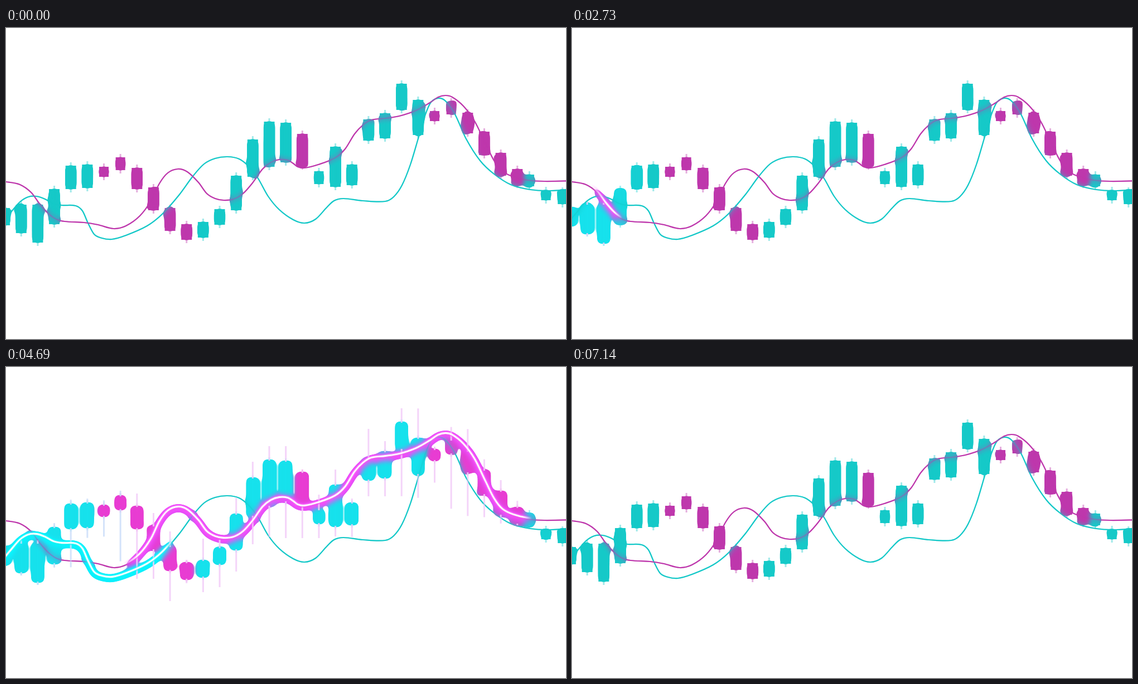
An HTML page with a canvas that plays this animation: 1004 by 558 pixels, repeating every 7.21 s.

```html
<!DOCTYPE html>
<html lang="en">
<head>
<meta charset="utf-8">
<title>Candles</title>
<style>
html, body { margin: 0; width: 100%; height: 100%; overflow: hidden; background: #fff; }
#stage { position: relative; width: 1004px; height: 558px; overflow: hidden; }
canvas { position: absolute; left: -20px; top: 0; }
#goo { filter: url(#merge); }
svg { position: absolute; width: 0; height: 0; }
</style>
</head>
<body>
<svg><filter id="merge" x="0" y="0" width="100%" height="100%" color-interpolation-filters="sRGB">
  <feGaussianBlur stdDeviation="5"/>
  <feColorMatrix values="1 0 0 0 0  0 1 0 0 0  0 0 1 0 0  0 0 0 16 -6.4"/>
</filter></svg>
<div id="stage">
  <canvas id="base"></canvas>
  <canvas id="goo"></canvas>
  <canvas id="top"></canvas>
</div>
<script>
const W = 1044, H = 558, PAD = 20, LOOP = 7210, STEP = 70;
const STARTS = [690, 2715, 4430, 6150];
const TEAL = [21, 201, 200], TEAL_LIT = [22, 225, 236];
const PINK = [190, 55, 172], PINK_LIT = [232, 60, 210];

const [base, goo, top2] = ['base', 'goo', 'top'].map(id => {
  const c = document.getElementById(id);
  c.width = W;
  c.height = H;
  const g = c.getContext('2d');
  g.translate(PAD, 0);
  return g;
});

// body top, body bottom, lit wick above, lit wick below
const BODIES = [
  [323,354,6,6], [317,368,6,6], [317,385,6,6], [289,352,9,8], [247,289,9,71],
  [245,287,9,20], [249,267,10,39], [232,255,11,103], [251,289,24,91], [286,327,24,53],
  [323,364,28,56], [352,380,6,8], [348,376,40,28], [325,353,15,42], [265,327,30,40],
  [200,267,30,51], [168,249,26,56], [170,241,28,66], [190,248,4,59], [257,280,28,27],
  [213,285,29,19], [245,282,9,23], [164,202,53,30], [153,198,20,34], [100,147,26,85],
  [129,192,55,43], [149,167,6,41], [132,155,25,102], [152,189,43,83], [186,228,23,47],
  [224,265,28,21], [253,281,27,6], [263,284,8,7], [291,309,8,5], [292,316,9,4]
];
const isPink = i => (i > 5 && i < 12) || i === 18 || (i > 25 && i < 32);
const candles = BODIES.map(([y0, y1, up, down], i) => ({
  x: -2.4 + 29.65 * i - (i > 31 ? 8 : 0),
  w: y1 - y0 < 25 ? 17 : 19,
  y0, y1, up, down, pink: isPink(i)
}));

const pinkLine = curve([-20,275, 0,276, 25,281, 45,295, 60,315, 75,332, 90,343, 105,347, 140,349,
  165,353, 193,360, 215,355, 240,337, 260,310, 275,279, 290,260, 308,253, 325,258, 345,277,
  360,297, 375,306, 390,309, 408,307, 425,297, 442,278, 460,253, 475,241, 490,236, 505,237,
  515,243, 523,249, 535,251, 560,245, 590,233, 608,217, 625,190, 640,174, 655,165, 680,162,
  705,158, 735,148, 760,134, 775,124, 788,121, 800,124, 820,140, 840,167, 860,208, 875,238,
  890,257, 910,267, 935,273, 965,275, 1024,274]);
const tealLine = curve([-20,366, 0,341, 10,329, 25,312, 40,303, 55,302, 70,307, 85,315, 100,318,
  125,319, 137,328, 147,350, 158,370, 172,377, 190,379, 215,372, 253,355, 280,334, 310,300,
  335,266, 355,244, 375,234, 397,231, 418,235, 436,249, 452,270, 470,302, 490,326, 515,344,
  535,350, 555,343, 575,322, 588,310, 605,306, 640,310, 680,311, 695,303, 710,282, 725,245,
  740,195, 752,155, 762,133, 775,126, 788,131, 805,155, 825,199, 850,238, 875,262, 905,281,
  940,290, 975,292, 1024,288]);

// smooth path through points with central-difference slopes
function curve(p) {
  const n = p.length / 2, path = new Path2D();
  const slope = i => {
    const a = Math.max(0, i - 1), b = Math.min(n - 1, i + 1);
    return (p[2 * b + 1] - p[2 * a + 1]) / (p[2 * b] - p[2 * a]);
  };
  path.moveTo(p[0], p[1]);
  for (let i = 0; i < n - 1; i++) {
    const x = p[2 * i], y = p[2 * i + 1], x2 = p[2 * i + 2], y2 = p[2 * i + 3], d = (x2 - x) / 3;
    path.bezierCurveTo(x + d, y + slope(i) * d, x2 - d, y2 - slope(i + 1) * d, x2, y2);
  }
  return path;
}

const rgba = (c, a = 1) => `rgba(${c.map(Math.round).join()},${a})`;
const mix = (a, b, k) => a.map((v, i) => v + (b[i] - v) * k);
function smooth(a, b, v) {
  const k = Math.min(1, Math.max(0, (v - a) / (b - a)));
  return k * k * (3 - 2 * k);
}

// head and tail of both light pulses, u ms after a start
function pulses(u) {
  const tealTail = u < 500 ? (u - 330) * 4.68 : 795 + 210 * (1 - Math.exp((500 - u) / 60));
  return [
    { path: pinkLine, head: 38 + 3.48 * u, tail: -10 + (u - 220) * 5.5, from: 35, fade: 1,
      edge: [186, 70, 232], glow: [255, 80, 255], wick: [243, 205, 248] },
    { path: tealLine, head: (u - 190) * 4.3, tail: tealTail, from: -100, fade: 1 - smooth(530, 640, u),
      edge: [40, 205, 245], glow: [0, 255, 255], wick: [205, 222, 250] }
  ];
}

function stroke(g, path, style, width) {
  g.strokeStyle = style;
  g.lineWidth = width;
  g.stroke(path);
}

function span(g, p, color, alpha = 1) {
  const a = Math.max(p.from, p.tail), len = p.head - a, k = Math.min(0.45, 28 / len);
  const grad = g.createLinearGradient(a, 0, p.head, 0);
  grad.addColorStop(0, rgba(color, 0));
  grad.addColorStop(k, rgba(color, alpha * p.fade));
  grad.addColorStop(1 - k * 0.6, rgba(color, alpha * p.fade));
  grad.addColorStop(1, rgba(color, 0));
  return grad;
}

function drawCandle(c, live, dim) {
  let lit = 0, reach = 0, tone = null;
  for (const p of live) {
    const kept = smooth(p.tail - 30, p.tail + 10, c.x) * dim;
    lit = Math.max(lit, kept * (1 - smooth(p.head - 40, p.head + 60, c.x)));
    const r = c.x < p.head ? kept * (1 - Math.exp((c.x - p.head) / 40)) : 0;
    if (r > reach) { reach = r; tone = p.wick; }
  }
  const color = c.pink ? mix(PINK, PINK_LIT, lit) : mix(TEAL, TEAL_LIT, lit);
  const h = c.y1 - c.y0, grow = 1.6 * lit;

  base.fillStyle = rgba(color, 0.4);
  base.fillRect(c.x - 1.5, c.y0 - 6, 3, h + 12);
  base.fillStyle = rgba(color);
  if (lit < 0.5) base.fillRect(c.x - c.w / 2, c.y0, c.w, h);

  goo.fillStyle = rgba(color);
  goo.fillRect(c.x - c.w / 2 - grow, c.y0 - grow, c.w + 2 * grow, h + 2 * grow);

  if (reach > 0.02) {
    top2.fillStyle = rgba(tone, 0.85 * Math.min(1, reach * 2));
    const up = c.up * reach, down = c.down * reach;
    top2.fillRect(c.x - 1.5, c.y0 - up, 3, up);
    top2.fillRect(c.x - 1.5, c.y1, 3, down);
  }
}

function draw(t) {
  const start = STARTS.filter(s => s <= t).pop();
  const u = start === undefined ? 1e4 : t - start;
  const live = u < 850 ? pulses(u) : [];
  const shown = live.filter(p => p.fade > 0 && p.head > Math.max(p.from, p.tail) + 1);
  const dim = 1 - smooth(580, 800, u);

  for (const g of [base, goo, top2]) g.clearRect(-PAD, 0, W, H);

  for (const c of candles) drawCandle(c, live, dim);
  for (const [path, color] of [[tealLine, TEAL], [pinkLine, PINK]]) {
    stroke(base, path, rgba(color), 2.2);
    stroke(goo, path, rgba(color), 2.2);
    stroke(top2, path, rgba(color, 0.4), 2);
  }
  for (const p of shown) {
    stroke(goo, p.path, span(goo, p, p.edge), 13);
    stroke(goo, p.path, span(goo, p, p.glow), 9);
  }
  top2.save();
  top2.translate(0, -2.5);
  for (const p of shown) {
    stroke(top2, p.path, span(top2, p, p.glow, 0.3), 9);
    stroke(top2, p.path, span(top2, p, mix(p.glow, [255, 255, 255], 0.4), 0.5), 5.5);
    stroke(top2, p.path, span(top2, p, [255, 255, 255]), 2.8);
  }
  top2.restore();
}

const origin = performance.now();
let last = -1;
function tick() {
  const t = Math.floor(((performance.now() - origin) % LOOP) / STEP) * STEP;
  if (t !== last) draw(last = t);
  requestAnimationFrame(tick);
}
tick();
</script>
</body>
</html>
```
